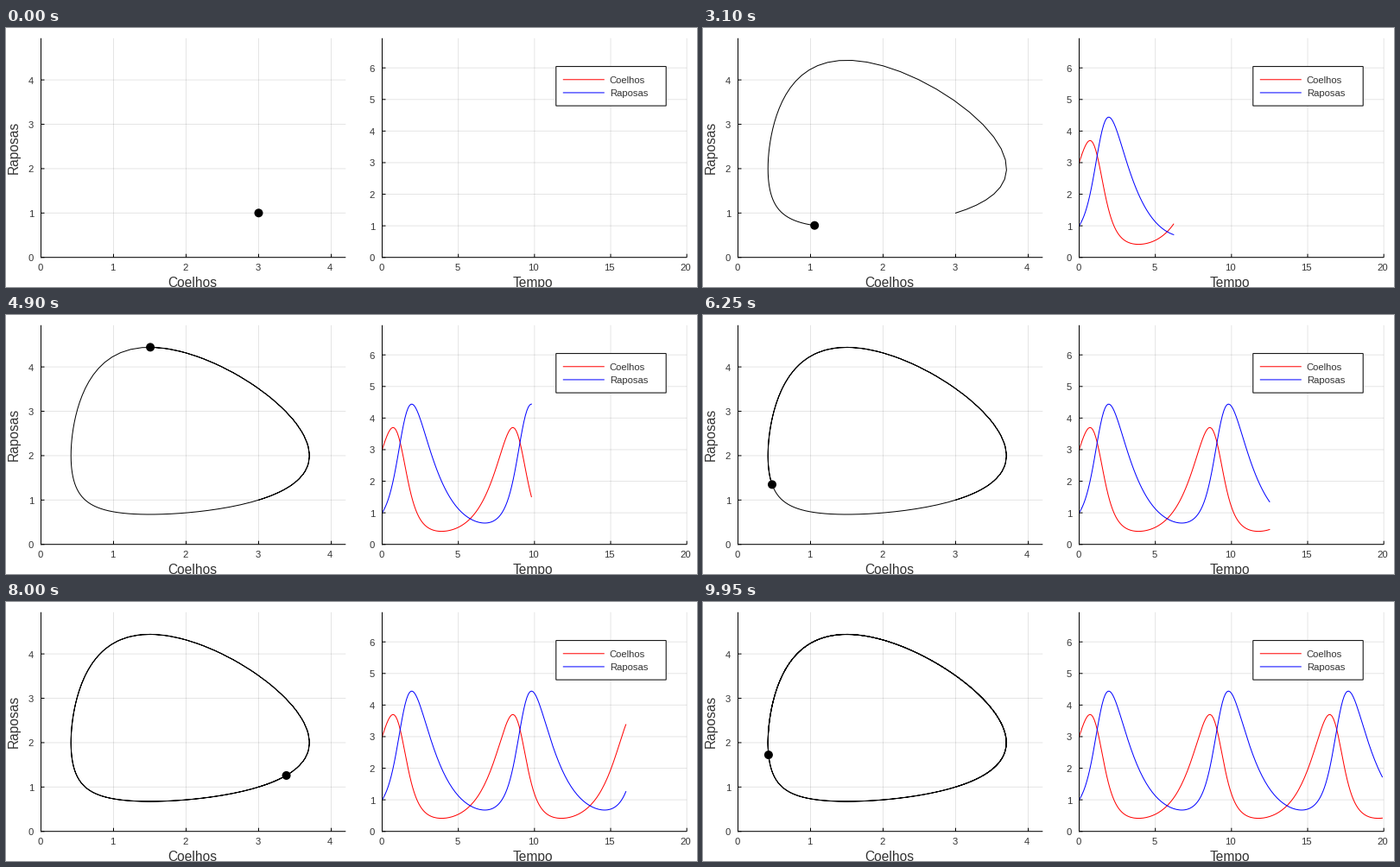
A matplotlib script for the animation above (10000 ms loop, 800x300 px).

```python
import numpy as np
import matplotlib.pyplot as plt
from matplotlib.animation import FuncAnimation
from matplotlib.lines import Line2D
from matplotlib.patches import Ellipse, Rectangle

W, H, DPI = 800, 300, 100
PX = 72 / DPI  # one pixel in points
FRAMES, DT, SUBSTEPS = 200, 0.1, 10
TOP, BOTTOM = 11.8, 265.7
TICK, DOT = 4, 10
TEXT = "#333333"
SMALL, LARGE = 11.3, 15.5

plt.rcParams["font.family"] = "Liberation Sans"


def growth(state):
    rabbits, foxes = state
    return np.array([rabbits * (1 - 0.5 * foxes), foxes * (0.5 * rabbits - 0.75)])


def rk4(state, h):
    k1 = growth(state)
    k2 = growth(state + h / 2 * k1)
    k3 = growth(state + h / 2 * k2)
    k4 = growth(state + h * k3)
    return state + h / 6 * (k1 + 2 * k2 + 2 * k3 + k4)


def simulate():
    states = [np.array([3.0, 1.0])]
    for _ in range(FRAMES - 1):
        state = states[-1]
        for _ in range(SUBSTEPS):
            state = rk4(state, DT / SUBSTEPS)
        states.append(state)
    return np.array(states).T


# The helpers below take pixels counted from the top left corner.
def label(x, y, text, size=SMALL, **kw):
    fig.text(x / W, 1 - y / H, text, fontsize=size * PX, color=TEXT,
             va="baseline", **kw)


def rule(x0, y0, x1, y1, color="black", alpha=1, zorder=-2):
    fig.add_artist(Line2D([x0 / W, x1 / W], [1 - y0 / H, 1 - y1 / H],
                          color=color, alpha=alpha, linewidth=PX, zorder=zorder,
                          solid_capstyle="butt", snap=False,
                          transform=fig.transFigure))


def make_axes(left, right, xmax, ymax, xticks, yticks):
    xs = [left + v / xmax * (right - left) for v in xticks]
    ys = [BOTTOM - v / ymax * (BOTTOM - TOP) for v in yticks]
    for x, v in zip(xs, xticks):
        rule(x, BOTTOM, x, TOP, alpha=0.1)
        rule(x, BOTTOM, x, BOTTOM - TICK)
        label(x - 1.2, 281.3, str(v), ha="center")
    for y, v in zip(ys, yticks):
        rule(left, y, right, y, alpha=0.1)
        rule(left, y, left + TICK, y)
        label(left - 8.5, y + 4.4, str(v), ha="right")
    rule(left, BOTTOM + 0.5, left, TOP)
    rule(left - 0.5, BOTTOM, right, BOTTOM)

    ax = fig.add_axes([left / W, 1 - BOTTOM / H,
                       (right - left) / W, (BOTTOM - TOP) / H])
    ax.set(xlim=(0, xmax), ylim=(0, ymax))
    ax.set_axis_off()
    return ax


def draw_legend(left, top, right, bottom, entries):
    fig.add_artist(Rectangle((left / W, 1 - bottom / H), (right - left) / W,
                             (bottom - top) / H, facecolor="white",
                             edgecolor="black", linewidth=PX, snap=False,
                             zorder=-1, transform=fig.transFigure))
    step = (bottom - top) / (len(entries) + 1)
    for i, (name, color) in enumerate(entries, 1):
        y = top + step * i
        rule(left + 8, y, left + 56, y, color, zorder=1)
        label(left + 62, y + 4.2, name)


fig = plt.figure(figsize=(W / DPI, H / DPI), dpi=DPI, facecolor="white")
rabbits, foxes = simulate()
time = np.arange(FRAMES) * DT

phase = make_axes(40.5, 393.3, 4.2, 4.94, range(5), range(5))
series = make_axes(435.5, 788.2, 20, 6.94, range(0, 21, 5), range(7))

label(215.9, 300, "Coelhos", LARGE, ha="center")
label(609.9, 300, "Tempo", LARGE, ha="center")
label(13.7, 169.4, "Raposas", LARGE, rotation=90, rotation_mode="anchor")
draw_legend(636.8, 44.6, 764.2, 90.1, [("Coelhos", "red"), ("Raposas", "blue")])

orbit, = phase.plot([], [], color="black", linewidth=PX)
dot = phase.add_patch(Ellipse((0, 0), DOT * 4.2 / (393.3 - 40.5),
                              DOT * 4.94 / (BOTTOM - TOP),
                              color="black", linewidth=0, zorder=3))
rabbit_line, = series.plot([], [], color="red", linewidth=PX)
fox_line, = series.plot([], [], color="blue", linewidth=PX)


def update(frame):
    n = frame + 1
    orbit.set_data(rabbits[:n], foxes[:n])
    dot.set_center((rabbits[frame], foxes[frame]))
    rabbit_line.set_data(time[:n], rabbits[:n])
    fox_line.set_data(time[:n], foxes[:n])
    return orbit, dot, rabbit_line, fox_line


anim = FuncAnimation(fig, update, frames=FRAMES, interval=50,
                     repeat=True, repeat_delay=0)
plt.show()
```
